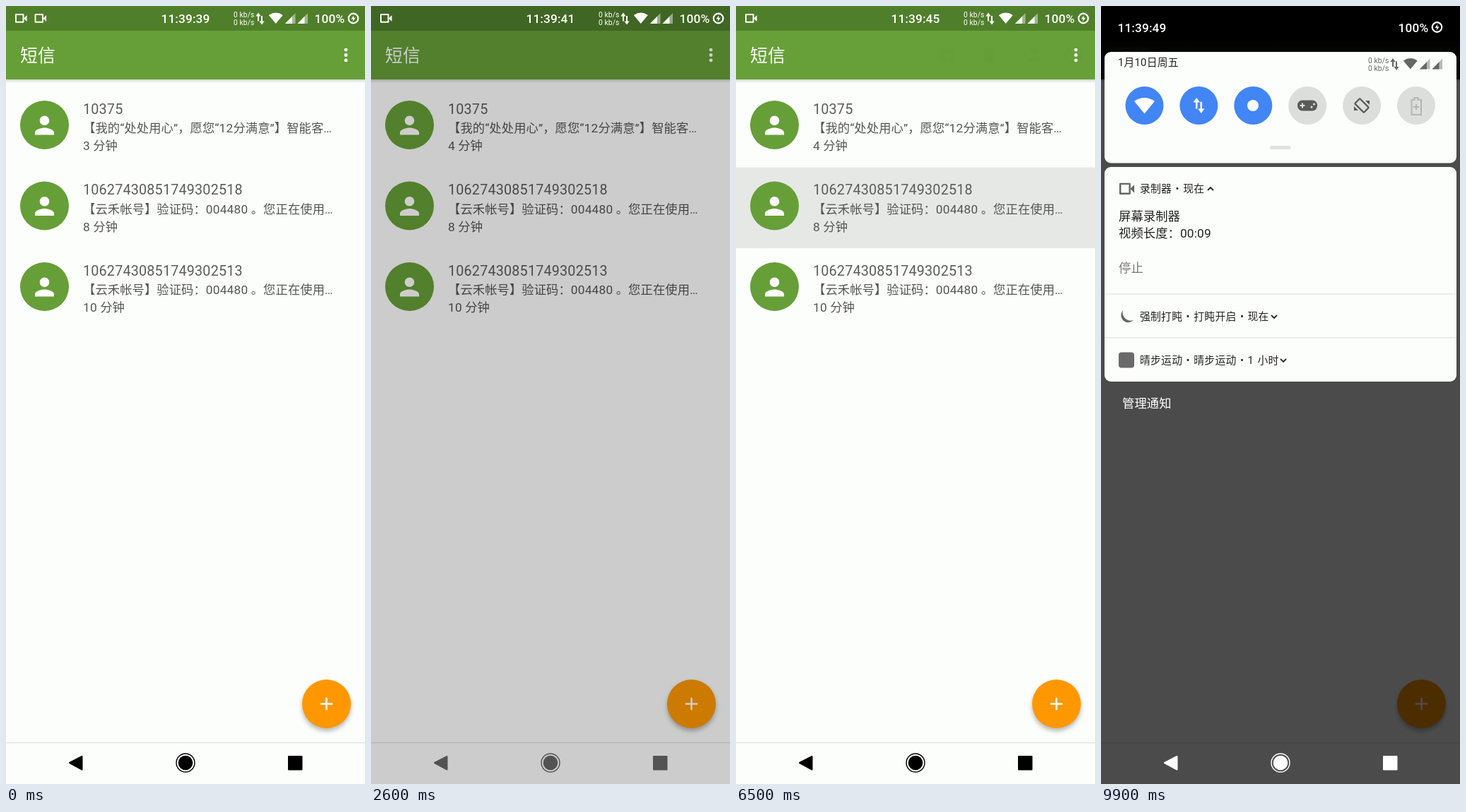
Animation, 508 px wide and 1102 px high, one loop 10000 ms. Source, as an HTML page:

```html
<!DOCTYPE html>
<html lang="zh-CN">
<head>
<meta charset="utf-8">
<style>
html, body { margin: 0; width: 100%; height: 100%; overflow: hidden; background: #fcfefc; }
svg { display: block; width: 508px; height: 1102px; font-family: Roboto, "Noto Sans CJK SC", "Noto Sans CJK", sans-serif; }
text { white-space: pre; }
.link { text-decoration: underline; }
#fab { filter: drop-shadow(0 4px 3px rgba(0,0,0,.28)); }
#dialog rect { filter: drop-shadow(0 8px 12px rgba(0,0,0,.4)); }
</style>
</head>
<body>
<svg id="stage" viewBox="0 0 508 1102"></svg>
<script>
const PAPER = '#fcfefc', GREEN = '#669f37', DARK_GREEN = '#507f2b', ORANGE = '#ff9800', INK = '#424242';
const DP = 1.234, ROW = 114.5, HEIGHT = 1102, LOOP = 10000;
const DEVICE_PX = 1080 / 508;

const ICONS = {
  person: 'M12 12c2.21 0 4-1.79 4-4s-1.79-4-4-4-4 1.79-4 4 1.79 4 4 4zm0 2c-2.67 0-8 1.34-8 4v2h16v-2c0-2.66-5.33-4-8-4z',
  check: 'M9 16.17L4.83 12l-1.42 1.41L9 19 21 7l-1.41-1.41z',
  close: 'M19 6.41L17.59 5 12 10.59 6.41 5 5 6.41 10.59 12 5 17.59 6.41 19 12 13.41 17.59 19 19 17.59 13.41 12z',
  archive: 'M20.54 5.23l-1.39-1.68C18.88 3.21 18.47 3 18 3H6c-.47 0-.88.21-1.16.55L3.46 5.23C3.17 5.57 3 6.02 3 6.5V19c0 1.1.9 2 2 2h14c1.1 0 2-.9 2-2V6.5c0-.48-.17-.93-.46-1.27zM12 17.5L6.5 12H10v-2h4v2h3.5L12 17.5zM5.12 5l.81-1h12l.94 1H5.12z',
  trash: 'M6 19c0 1.1.9 2 2 2h8c1.1 0 2-.9 2-2V7H6v12zM19 4h-3.5l-1-1h-5l-1 1H5v2h14V4z',
  addPerson: 'M15 12c2.21 0 4-1.79 4-4s-1.79-4-4-4-4 1.79-4 4 1.79 4 4 4zm-9-2V7H4v3H1v2h3v3h2v-3h3v-2H6zm9 4c-2.67 0-8 1.34-8 4v2h16v-2c0-2.66-5.33-4-8-4z',
  clip: 'M2 12.5C2 9.46 4.46 7 7.5 7H18c2.21 0 4 1.79 4 4s-1.79 4-4 4H9.5C8.12 15 7 13.88 7 12.5S8.12 10 9.5 10H17v2H9.41c-.55 0-.55 1 0 1H18c1.1 0 2-.9 2-2s-.9-2-2-2H7.5C5.57 9 4 10.57 4 12.5S5.57 16 7.5 16H17v2H7.5C4.46 18 2 15.54 2 12.5z',
  back: 'M20 11H7.83l5.59-5.59L12 4l-8 8 8 8 1.41-1.41L7.83 13H20v-2z',
  plus: 'M19 13h-6v6h-2v-6H5v-2h6V5h2v6h6v2z',
  more: 'M12 8a2 2 0 1 0 0-4 2 2 0 0 0 0 4zm0 2a2 2 0 1 0 0 4 2 2 0 0 0 0-4zm0 6a2 2 0 1 0 0 4 2 2 0 0 0 0-4z'
};

const icon = (name, x, y, fill, s = DP) =>
  `<path d="${ICONS[name]}" fill="${fill}" transform="translate(${x - 12 * s} ${y - 12 * s}) scale(${s})"/>`;
// y is the vertical middle of the glyphs; advances are rounded up to whole device pixels
const text = (x, y, size, fill, str, attrs = '') => {
  const spacing = Math.ceil(size * DEVICE_PX) / DEVICE_PX - size;
  const content = str.replace(/\d+/g, '<tspan letter-spacing=".2">$&</tspan>');
  return `<text x="${x}" y="${y + size * .37}" font-size="${size}" letter-spacing="${spacing}" fill="${fill}" ${attrs}>${content}</text>`;
};
const rect = (x, y, w, h, fill, attrs = '') =>
  `<rect x="${x}" y="${y}" width="${w}" height="${h}" fill="${fill}" ${attrs}/>`;
const circle = (x, y, r, fill, attrs = '') => `<circle cx="${x}" cy="${y}" r="${r}" fill="${fill}" ${attrs}/>`;
const path = (d, attrs = '') => `<path d="${d}" ${attrs}/>`;
const line = (d, color, w, attrs = '') => path(d, `fill="none" stroke="${color}" stroke-width="${w}" ${attrs}`);

const windowFrame = rect(0, 0, 508, 35, DARK_GREEN) + rect(0, 35, 508, 69, GREEN) + rect(0, 104, 508, 5, 'url(#edge)');
const navFloor = rect(0, 1043, 508, 100, PAPER) + rect(0, 1043, 508, 1.2, '#dfe1df');

const row = (i, title, body, age) => {
  const y = i * ROW;
  return rect(0, 114 + y, 508, ROW, '#000', `id="press${i}" opacity="0"`) +
    circle(54.5, 168.5 + y, 34.5, GREEN) +
    `<g id="person${i}">${icon('person', 54.5, 169 + y, '#fff', 1.69)}</g>` +
    `<g id="check${i}">${icon('check', 54.5, 169 + y, '#fff', 1.65)}</g>` +
    text(109, 145.5 + y, 19.74, '#5c5c5c', title) +
    text(109, 173 + y, 17.3, '#555', body) +
    text(109, 198 + y, 17.3, '#555', age, `id="age${i}"`);
};

const CODE_TEXT = '【云禾帐号】验证码：004480 。您正在使用…';
const listWindow = rect(0, 0, 508, 1150, PAPER) +
  row(0, '10375', '【我的“处处用心”，愿您“12分满意”】智能客…', '3 分钟') +
  row(1, '10627430851749302518', CODE_TEXT, '8 分钟') +
  row(2, '10627430851749302513', CODE_TEXT, '10 分钟') +
  windowFrame + text(20, 70, 24.7, '#fff', '短信') + icon('more', 481, 69.5, '#fff') +
  `<g id="actions">${rect(0, 35, 508, 69, PAPER)}${icon('close', 34.5, 69.5, '#111')}
    ${icon('archive', 299, 69, INK)}${icon('trash', 359, 69, INK)}${icon('addPerson', 418, 69, INK)}
    ${circle(478, 69, 11.1, 'none', `stroke="${INK}" stroke-width="2.5"`)}${line('M470 61L486 77', INK, 2.5)}</g>` +
  `<g id="fab">${circle(453.5, 988.5, 34.5, ORANGE)}</g>` + icon('plus', 453.5, 988.5, '#fff') + navFloor;

const USAGE = ['流量当前使用情况：截至01月', '10日11时34分，您的 国内1元', '1G日享包剩余 0.00MB ; 0元1G',
  '国内流量月包资费剩余 0.00MB ;', '合约版畅听会员（白银版）次', '月生效剩余 19.87GB ; 。 点击',
  '<tspan class="link">http://u.10375.cn/tAE3v</tspan> ，随时查看', '流量使用情况。'];
const TIPS = ['【我的“处处用心”，愿您“12分满', '意”】智能客服助理听您说话，就能', '快速帮您解答问题。使用小贴士：',
  '1、您可以说“查流量”，了解当月', '已用流量、剩余流量；2、说“查话', '费”直接收听您话费余额信息。3、', '说“报修故障”，即能及时反馈您的',
  '故障问题；4、更多热门咨询：“查', '话费账单”、“查交费记录”、“查停', '机原因”、“办流量”、“取消收费业', '务”、“取消流量封顶”等。5、通话时',
  '请避免使用免提功能，尽量在安静', '的环境中简短说出需求。赶快拨打', '<tspan class="link">10375</tspan>体验吧！'];
const REMINDER = ['可以回复TDZD进行退订，或在手网', '厅取消该业务。若您不想再收到流', '量例行提醒信息，可以回复QXTX到',
  '<tspan class="link">10375</tspan>进行退订。'];
const bubble = (x, top, bottom, firstLine, lines) => rect(x, top, 430 - x, bottom - top, GREEN, 'rx="4"') +
  lines.map((s, i) => text(95, firstLine + i * 28.72, 19.74, '#fff', s)).join('');

const chatWindow = rect(0, 0, 508, 1150, '#ebeeeb') +
  bubble(79, 60, 236.3, 123.3, REMINDER) + bubble(78, 239.3, 493.6, 265.3, USAGE) + bubble(78, 496.3, 948.3, 523.2, TIPS) +
  text(95, 924.3, 14.8, '#c6dcb3', '4 分钟 发至CARD 1') +
  icon('clip', 40, 995, '#6e706e') +
  path('M83 969.3H440L429 980.5V1018a3 3 0 0 1-3 3H83a3 3 0 0 1-3-3V972a3 3 0 0 1 3-3Z', `fill="${PAPER}"`) +
  text(90, 995.5, 19.74, '#999', '发送信息') +
  `<g id="send">${circle(0, 0, 26, GREEN)}${icon('person', 0, 0, '#fff', 1.25)}</g>` +
  windowFrame + icon('back', 34.5, 69.5, '#fff') + text(89, 70, 24.7, '#fff', '10375') + icon('more', 481, 69.5, '#fff') +
  navFloor;

const camera = color => line('M14 12h10.5v10.8H14z', color, 1.9, 'stroke-linejoin="round"') + path('M25 17.4L29.5 13V22z', `fill="${color}"`);
const wifi = path('M381.8 25L371.8 13Q381.8 6.2 391.8 13Z');
const arrows = path('M353.3 14.5L357 9.5L360.7 14.5H358V21.5H356V14.5ZM358.5 21.5H361V14H363V21.5H365.6L362 26.5Z');
const bars = x => path(`M${x} 25h14.5v-15z`, 'opacity=".45"') + path(`M${x} 25h10v-10.3z`);
const network = text(322, 12.5, 10.3, 'inherit', '0 kb/s') + text(322, 23.5, 10.3, 'inherit', '0 kb/s') +
  arrows + wifi + bars(395) + bars(412.5);
const battery = text(436.5, 18, 17.3, '#fff', '100%', 'font-weight="500"') +
  circle(491.5, 17.5, 6.8, 'none', 'stroke="#fff" stroke-width="2.2"') + path('M492.5 12.8l-4 5.6h2.8l-1 4l4.4-5.6h-3z', 'fill="#fff"');

const enlarged = (art, x, y, fromX, fromY, s) =>
  `<g fill="#fff" transform="translate(${x} ${y}) scale(${s}) translate(${-fromX} ${-fromY})">${art}</g>`;
const tileIcons = [
  enlarged(wifi, 61.5, 141, 381.8, 17.2, 1.46),
  enlarged(arrows, 138.5, 141, 359.5, 18, 1.3),
  circle(215, 141, 8, '#fff'),
  rect(278, 133.5, 28, 15, '#5a5a5a', 'rx="7"') + line('M281.5 141h7M285 137.5v7', '#dcdedc', 2) +
    circle(298, 143, 1.6, '#dcdedc') + circle(301.5, 139, 1.6, '#dcdedc'),
  rect(360, 136, 18, 10, 'none', 'rx="1" stroke="#5a5a5a" stroke-width="2.3" transform="rotate(45 369 141)"') +
    path('M374 134l6 0l0 6zM364 148l-6 0l0-6z', 'fill="#5a5a5a"'),
  line('M439.5 133h4v-3h5v3h4.5v21h-13.5zM446 139v8M442 143h8', '#b4b6b4', 2)
];
const tiles = tileIcons.map((art, i) => circle(61.5 + 76.9 * i, 141, 27, i < 3 ? '#4285f4' : '#dcdedc') + art).join('');
const note = (y, str) => text(55, y, 14.8, '#222', str, 'word-spacing="1.5"');
const chevron = (x, y, dir) => line(`M${x - 4} ${y - 2 * dir}l4 ${4 * dir}l4 ${-4 * dir}`, '#222', 1.8);

const shadeCards = rect(5, 65, 498, 157.5, PAPER, 'rx="9"') + text(24, 80, 14.8, '#222', '1月10日周五') +
  `<g fill="#666" transform="translate(56 64.5)">${network}</g>` + tiles + rect(239, 198, 29.5, 5, '#dfe1df', 'rx="2.5"') +
  rect(5, 228, 498, 304, PAPER, 'rx="9"') + rect(5, 407.5, 498, 1, '#dcdedc') + rect(5, 469.5, 498, 1, '#dcdedc') +
  `<g transform="translate(9.3 236.5) scale(1.28)">${camera('#666')}</g>` +
  note(259, '录制器 • 现在') + chevron(155, 259, -1) +
  text(25, 297.5, 17.3, '#222', '屏幕录制器') + text(25, 322, 17.3, '#222', '视频长度：00:09') + text(25, 371, 17.3, '#777', '停止') +
  path('M31 431A9.5 9.5 0 1 0 46 445A11.5 11.5 0 0 1 31 431Z', 'fill="#666"') +
  note(440, '强制打盹 • 打盹开启 • 现在') + chevron(245, 440, 1) +
  rect(25, 490.5, 22, 22, '#6a6a6a', 'rx="4"') + note(502, '晴步运动 • 晴步运动 • 1 小时') + chevron(258, 502, 1) +
  text(30, 562.5, 17.3, '#fff', '管理通知');

stage.innerHTML = `
<defs>
  <linearGradient id="edge" x2="0" y2="1"><stop stop-opacity=".16"/><stop offset="1" stop-opacity="0"/></linearGradient>
  <linearGradient id="header" x2="0" y2="1"><stop offset=".45"/><stop offset=".62" stop-opacity=".86"/><stop offset="1" stop-opacity=".86"/></linearGradient>
  <clipPath id="reveal"><rect id="revealBox" width="508" height="${HEIGHT}"/></clipPath>
</defs>
<g id="list">${listWindow}</g>
${rect(0, 0, 508, HEIGHT, '#000', 'id="behind"')}
<g id="chatClip" clip-path="url(#reveal)"><g id="chat">${chatWindow}</g></g>
${rect(0, 0, 508, HEIGHT, '#000', 'id="dim"')}
<g id="dialog">${rect(33, 472.5, 442, 132.5, PAPER, 'rx="2"')}${text(63, 512, 24.7, '#222', '要删除这些对话吗？')}
  ${text(324, 567, 17.3, '#f59300', '取消', 'font-weight="500"')}${text(403, 567, 17.3, '#f59300', '删除', 'font-weight="500"')}</g>
${rect(0, 0, 508, HEIGHT, '#000', 'id="scrim"')}
${rect(0, 0, 508, 104, 'url(#header)', 'id="headerShade"')}
<g id="cards">${shadeCards}</g>
<g id="status" fill="#fff">${camera('#fff')}<g id="camera2" transform="translate(27.5 0)">${camera('#fff')}</g>${network}</g>
${text(219.5, 18, 17.3, '#fff', '', 'id="clock" font-weight="500"')}
<g id="battery">${battery}</g>
${rect(32, 1043, 133, 59, '#000', 'id="backPress" rx="29"')}
<g id="nav" fill="currentColor" stroke="currentColor" stroke-linejoin="round">
  <path d="M90 1072L107.5 1063V1081.5Z" stroke-width="2"/>
  <circle cx="254" cy="1072" r="10.3" stroke="none"/><circle cx="254" cy="1072" r="13" fill="none" stroke-width="1.4"/>
  <rect x="400" y="1063" width="18.5" height="18.5" stroke-width="2"/>
</g>`;

const $ = id => document.getElementById(id);
const fade = (id, v) => $(id).setAttribute('opacity', v);
const move = (id, v) => $(id).setAttribute('transform', v);
const shift = (id, x, y) => move(id, `translate(${x} ${y})`);

// cubic-bezier(.4, 0, .2, 1)
function fastOutSlowIn(x) {
  let lo = 0, hi = 1;
  for (let i = 0; i < 20; i++) {
    const s = (lo + hi) / 2, r = 1 - s;
    if (1.2 * r * r * s + .6 * r * s * s + s ** 3 < x) lo = s; else hi = s;
  }
  return lo * lo * (3 - 2 * lo);
}
const quickOut = x => 1 - (1 - x) ** 4.5;

function render(t) {
  const ramp = (a, b) => Math.min(1, Math.max(0, (t - a) / (b - a)));
  const pulse = (a, b, c, d) => ramp(a, b) - ramp(c, d);

  // list: presses, selection, action bar
  fade('press0', .085 * (pulse(700, 900, 1400, 1550) + pulse(3400, 3550, 3650, 3780)));
  fade('press1', .085 * pulse(6200, 6400, 6820, 7000));
  const picked = [pulse(1050, 1200, 2500, 2510), pulse(6500, 6640, 8050, 8060), 0];
  picked.forEach((v, i) => { fade('check' + i, v); fade('person' + i, 1 - v); });
  fade('actions', picked[0] + picked[1]);
  $('age0').textContent = (t < 1100 ? 3 : 4) + ' 分钟';

  // conversation opens and closes
  const opening = ramp(3651, 4076), closing = ramp(4322, 4747);
  const open = fastOutSlowIn(opening) - fastOutSlowIn(closing);
  shift('list', 0, -21.6 * open);
  fade('behind', .2 * open);
  shift('chat', 0, 45.4 * (1 - open));
  $('revealBox').setAttribute('y', HEIGHT * (1 - quickOut(opening) + quickOut(closing)) - 6);
  $('chatClip').setAttribute('display', opening > 0 && closing < 1 ? 'inline' : 'none');
  move('send', `translate(467 993.5) scale(${ramp(3660, 3862)})`);
  fade('backPress', .05 * pulse(4250, 4350, 4600, 4900));

  // confirmation dialog
  const dim = pulse(1750, 1950, 2500, 2650) + pulse(7220, 7450, 8050, 8200);
  const shown = pulse(1780, 1950, 2500, 2580) + pulse(7250, 7450, 8050, 8130);
  const scale = .9 + .1 * (t < 2600 ? ramp(1780, 1950) : ramp(7250, 7450));
  fade('dim', .6 * dim);
  fade('dialog', shown);
  move('dialog', `translate(254 539) scale(${scale}) translate(-254 -539)`);

  // notification shade
  const pull = fastOutSlowIn(ramp(8850, 9600));
  fade('scrim', .7 * pull);
  fade('headerShade', pull);
  shift('cards', 0, -590 * (1 - pull));
  fade('status', 1 - Math.min(1, pull * 3));
  fade('camera2', 1 - ramp(80, 200));
  shift('clock', -196 * pull, 12.5 * pull);
  shift('battery', -16 * pull, 12.5 * pull);
  $('clock').textContent = '11:39:' + (39 + Math.floor((t + 100) / 1000));

  const tone = Math.round(255 * Math.max(dim, pull));
  $('nav').style.color = `rgb(${tone},${tone},${tone})`;
}

function tick() {
  render(performance.now() % LOOP);
  requestAnimationFrame(tick);
}
tick();
</script>
</body>
</html>
```
